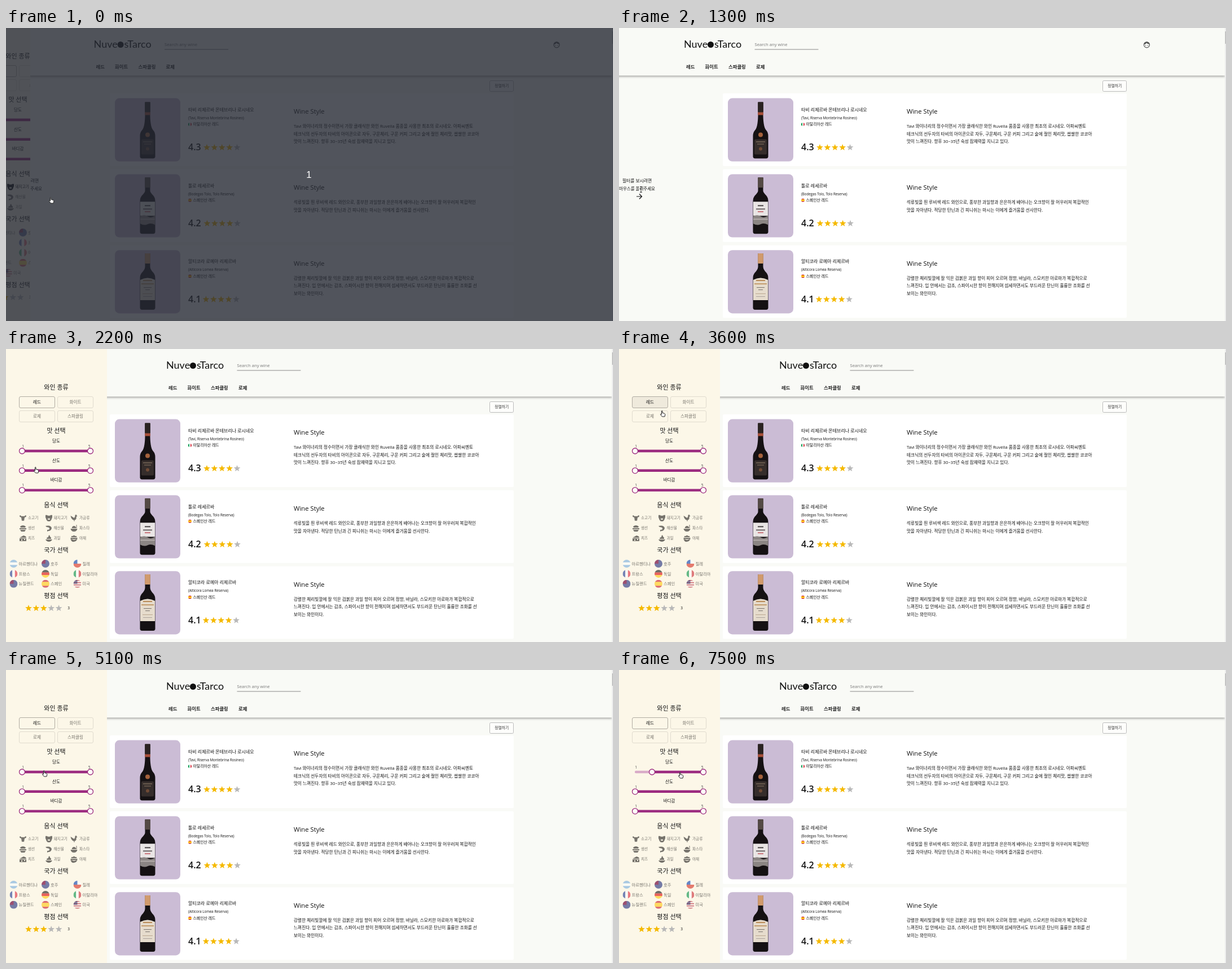
An HTML page with a canvas that plays this animation: 1076 by 520 pixels, repeating every 8 s.

```html
<!DOCTYPE html>
<html lang="ko">
<meta charset="utf-8">
<style>
html, body { margin: 0; width: 100%; height: 100%; overflow: hidden; background: #f9faf6 }
canvas { display: block }
</style>
<canvas id="stage" width="1076" height="520"></canvas>
<script>
const g = document.getElementById('stage').getContext('2d');
const FONT = '"Open Sans", "Noto Sans CJK KR", "Noto Sans CJK", sans-serif';
const PURPLE = '#9b2a7f', GOLD = '#f5b900', PAGE = '#f9faf6';

const wines = [
  { title: '타비 리제르바 몬테브리나 로시네오', sub: '(Tavi, Riserva Montebrina Rosineo)',
    origin: '이탈리아산 레드', flag: 5, rate: '4.3', starX: 356, cap: '#2a2321', shoulder: 54,
    text: ['Tavi 와이너리의 정수이면서 가장 클래식한 와인 Ruvella 품종을 사용한 최초의 로시네오. 아파씨멘토',
      '테크닉의 선두자의 타비의 아이콘으로 자두, 구운체리, 구운 커피 그리고 술에 절인 체리맛, 쌉쌀한 코코아',
      '맛이 느껴진다. 향후 30~35년 숙성 잠재력을 지니고 있다.'] },
  { title: '톨로 레세르바', sub: '(Bodegas Tolo, Tolo Reserva)',
    origin: '스페인산 레드', flag: 7, rate: '4.2', starX: 356.5, cap: '#544a45', shoulder: 36,
    text: ['석류빛을 띈 루비색 레드 와인으로, 풍부한 과일향과 은은하게 배어나는 오크향이 잘 어우러져 복합적인',
      '맛을 자아낸다. 적당한 탄닌과 긴 피니쉬는 마시는 이에게 즐거움을 선사한다.'] },
  { title: '알티코라 로메아 리제르바', sub: '(Alticora Lomea Reserva)',
    origin: '스페인산 레드', flag: 7, rate: '4.1', starX: 354.5, cap: '#d09a6c', shoulder: 38,
    text: ['강렬한 체리빛깔에 잘 익은 검붉은 과일 향이 피어 오르며 정향, 바닐라, 스모키한 아로마가 복합적으로',
      '느껴진다. 입 안에서는 감초, 스파이시한 향이 전해지며 섬세하면서도 부드러운 탄닌이 훌륭한 조화를 선',
      '보이는 와인이다.'] }
];

// name, stripe direction, stripe colours, corner colour
const countries = [
  ['아르헨티나', 'h', ['#74acdf', '#fff', '#74acdf']],
  ['호주', 'h', ['#1d2a7c'], '#b8324c'],
  ['칠레', 'h', ['#fff', '#d52b1e'], '#0039a6'],
  ['프랑스', 'v', ['#1f3a93', '#fff', '#e0283c']],
  ['독일', 'h', ['#111', '#d00', '#fc0']],
  ['이탈리아', 'v', ['#009246', '#fff', '#ce2b37']],
  ['뉴질랜드', 'h', ['#1d2a7c'], '#b8324c'],
  ['스페인', 'h', ['#c60b1e', '#ffc400', '#ffc400', '#c60b1e']],
  ['미국', 'h', ['#b22234', '#fff', '#b22234', '#fff', '#b22234', '#fff', '#b22234'], '#3c3b6e']
];

const foods = [
  ['소고기', 'M-6-4Q-4-5-3-3H3Q4-5 6-4Q6-1 3-1L2 5H-2L-3-1Q-6-1-6-4Z'],
  ['돼지고기', 'M-6-5H-3L-2-4H2L3-5H6V-1L4 4L2 6H-2L-4 4L-6-1ZM-2 1H2V3H-2Z'],
  ['가금류', 'M-6-4L-3-2L0 0Q2-1 2-5L4-6L5-4L6-3L4-2Q5 3 1 4V6H0V4Q-5 3-6-4Z'],
  ['생선', 'M-5-3Q0-7 5-3L4-1H-4ZM-6 0H6V2H-6ZM-5 3H5L3 6H-3Z'],
  ['해산물', 'M-6-4Q4-6 5 0Q4 5-1 5L-3 6V3Q2 3 1 0Q0-2-4-2Z'],
  ['파스타', 'M-6 1H6Q5 6 0 6T-6 1ZM-4 0Q-3-4 0-4T4 0ZM4-6H5V0H4Z'],
  ['치즈', 'M-6-1L1-5Q6-4 6-1ZM-6 0H6V5H-6ZM-3 2V4H-1V2ZM2 1V3H4V1Z'],
  ['과일', 'M-6 2H6Q4 6 0 6T-6 2ZM-4 1Q-4-2-1-2Q-1-5 1-6Q2-2 4-1V1Z'],
  ['야채', 'M-6-1H6Q6 5 0 6T-6-1ZM-5-2Q-5-5-2-4Q0-7 2-4Q5-5 5-2ZM-4 1V2H-2V1ZM-1 1V3H1V1ZM2 1V2H4V1Z']
];

// time, left, top
const pointer = [
  [0, 76, 300], [100, 78, 301], [200, 78, 301], [900, 46, 282], [1000, 46, 282], [1100, 37, 281],
  [1900, 37, 281], [2200, 49, 209], [2400, 49, 210], [2500, 49, 210], [3200, 76, 93], [3500, 76, 93],
  [3600, 73, 109], [4300, 81, 186], [4400, 81, 186], [4500, 80, 186], [4600, 80, 186], [4700, 65, 180],
  [4800, 65, 180], [5100, 64, 178], [6300, 64, 178], [6500, 98, 180], [7100, 98, 180], [7500, 105, 181],
  [8000, 105, 181]
];

const HAND = new Path2D('M2.5 1Q3.3 0 4 1V4.4L7.8 5.4Q9 6 8.7 8L8 11H3.5L.6 7.6Q0 6 1.4 6.4L2.5 7.2Z');
const ARROW = new Path2D('M0 0V9.5L2.2 7.5L3.8 11L5.2 10.3L3.7 7H6.6Z');

function rect(x, y, w, h, color, r = 0, line) {
  g.beginPath();
  g.roundRect(x, y, w, h, r);
  if (color) { g.fillStyle = color; g.fill(); }
  if (line) { g.strokeStyle = line; g.lineWidth = 1; g.stroke(); }
}

function dot(x, y, r, fill, line, width = 1) {
  g.beginPath();
  g.arc(x, y, r, 0, 7);
  if (fill) { g.fillStyle = fill; g.fill(); }
  if (line) { g.strokeStyle = line; g.lineWidth = width; g.stroke(); }
}

// y is the middle of the capitals
function text(s, x, y, size, color = '#111', align = 'left', weight = 400, font = FONT) {
  g.font = `${weight} ${size}px ${font}`;
  g.fillStyle = color;
  g.textAlign = align;
  g.fillText(s, x, y + size * .36);
}

function stars(x, y, gold) {
  for (let i = 0; i < 5; i++) {
    g.beginPath();
    for (let k = 0; k < 10; k++) {
      const r = k % 2 ? 2.6 : 6.2, a = k * Math.PI / 5;
      g.lineTo(x + i * 13.4 + r * Math.sin(a), y + .6 - r * Math.cos(a));
    }
    g.fillStyle = i < gold ? GOLD : '#b8b8b8';
    g.fill();
  }
}

function flag([, dir, colors, corner], x, y, r) {
  g.save();
  g.beginPath();
  g.arc(x, y, r, 0, 7);
  g.clip();
  const s = 2 * r / colors.length;
  colors.forEach((c, i) => dir == 'h' ? rect(x - r, y - r + i * s, 2 * r, s, c)
                                      : rect(x - r + i * s, y - r, s, 2 * r, c));
  if (corner) rect(x - r, y - r, r, r, corner);
  g.restore();
}

function bottle(i, y, { cap, shoulder: s }) {
  g.save();
  g.translate(251, y);
  g.fillStyle = '#151113';
  g.fill(new Path2D(`M-4.5 0H4.5V24Q5 ${s - 9} 10 ${s - 4}Q13.5 ${s} 13.5 ${s + 6}V97Q13 100 10 100
    H-10Q-13 100-13.5 97V${s + 6}Q-13.5 ${s}-10 ${s - 4}Q-5 ${s - 9}-4.5 24Z`));
  rect(-4.8, 0, 9.6, 18, cap, 1);
  if (i == 0) {
    rect(-4.8, 18, 9.6, 5, '#a8503a');
    dot(0, 58, 4, '#a5623c');
    rect(-11, 66, 22, 27, '#352d2b', 2);
    rect(-8, 70, 16, 1, '#9a8670');
    rect(-6, 74, 12, 1, '#8a7663');
    dot(0, 83, 3, '#6f4a35');
  } else if (i == 1) {
    rect(-13, 43, 26, 25, '#e9e5e4');
    rect(-5, 49, 10, 2, '#4b4748');
    rect(-8, 55, 16, 2, '#6d6667');
    rect(-5, 60, 10, 1.5, '#c0515a');
    g.fillStyle = '#8b8583';
    g.fill(new Path2D('M-13 69Q-6 65 0 69T13 68V84Q6 80 0 83T-13 82Z'));
    rect(-13, 73, 26, 2, '#b4adab');
  } else {
    g.fillStyle = '#e6dccd';
    g.fill(new Path2D('M-13 47Q0 40 13 47V83H-13Z'));
    rect(-8, 47, 16, 2, '#b98a55');
    rect(-11, 53, 22, 2, '#c39b6c');
    rect(-7, 60, 14, 1, '#77706a');
    rect(-4, 64, 8, 1, '#77706a');
    rect(-9, 71, 18, 1, '#b9a58d');
    rect(-8, 76, 16, 1, '#a9a09a');
  }
  g.restore();
}

function card(wine, i) {
  g.save();
  g.translate(0, i * 134.8);
  rect(184, 116, 716, 129, '#fff', 2);
  rect(193, 124.6, 116, 112.2, '#cbbcd5', 8);
  bottle(i, i ? 130.5 : 131.5, wine);
  text(wine.title, 323, 145, 8);
  text(wine.sub, 323, 159.5, 6.2);
  flag(countries[wine.flag], 326, 171, 3);
  text(wine.origin, 331.5, 171, 6.9);
  text(wine.rate, 323, 211.5, 16, '#111', 'left', 600);
  stars(wine.starX, 211.5, 4);
  text('Wine Style', 510, 148, 11.3, '#111', 'left', 500);
  wine.text.forEach((s, k) => text(s, 510, 174.5 + k * 13.5, 7.7));
  g.restore();
}

function header(shift) {
  g.save();
  g.shadowColor = 'rgba(0,0,0,.4)';
  g.shadowBlur = 4;
  g.shadowOffsetY = 1.5;
  rect(-10, -10, 1084, 94.5, PAGE);
  g.restore();
  g.save();
  g.translate(shift, 0);
  text('Nuve', 115, 28.5, 18, '#111', 'left', 400, 'Lato, sans-serif');
  dot(162.5, 29.5, 5.5, '#111');
  text('sTarco', 169, 28.5, 18, '#111', 'left', 400, 'Lato, sans-serif');
  text('Search any wine', 240.5, 29.5, 7.7, '#777');
  rect(240.5, 37.5, 113, 1, '#8a8a8a');
  [['레드', 119], ['화이트', 152.5], ['스파클링', 194], ['로제', 243]]
    .forEach(([s, x]) => text(s, x, 68.5, 8.4, '#222', 'left', 700));
  dot(935.5, 29.8, 5, null, '#555', 1.2);
  g.fillStyle = '#555';
  g.fill(new Path2D('M930.5 29Q934 29 935 26.5Q937 29 940.5 28.5Q939 24.5 935.5 24.5Q931 25 930.5 29Z'));
  dot(933.6, 31, .7, '#555');
  dot(937.4, 31, .7, '#555');
  g.restore();
}

function page(t, shift) {
  rect(0, 0, 1076, 520, PAGE);
  wines.forEach(card);
  rect(857.5, 93.5, 42, 19, '#fdfdfb', 2, '#bbb');
  text('정렬하기', 878.7, 103, 6.8, '#333', 'center');
  text('필터를 보시려면', 32, 271.5, 7.8, '#111', 'center');
  text('마우스를 올려주세요', 32, 285.5, 7.5, '#111', 'center');
  g.strokeStyle = '#111';
  g.lineWidth = 1.2;
  const ax = t < 1300 ? 37 : 36;
  g.stroke(new Path2D(`M${ax - 5} 299H${ax + 4}M${ax} 294.5L${ax + 4.5} 299L${ax} 303.5`));
  header(shift);
  rect(1074, 0, 2, 520, '#ececec');
  rect(1074.5, 6, 1.5, 22, '#b9b9b9');
}

function slider(label, y, from) {
  text(label, 89, y - 18, 7.5, '#111', 'center');
  text('1', 30, y - 8.5, 6.5, '#444', 'center');
  text('5', 147.5, y - 8.5, 6.5, '#444', 'center');
  rect(28, y - 2.2, 122, 4.4, '#d9abc8', 2);
  rect(from, y - 2.2, 150 - from, 4.4, PURPLE, 2);
  for (const x of [from, 149.5]) dot(x, y, 5, '#fffdf8', PURPLE, 1.3);
}

function drawer(t, w) {
  const narrow = w < 100, title = (s, y) => text(s, 89, y, 11, '#111', 'center', 500);
  g.save();
  g.beginPath();
  g.rect(0, 0, w, 520);
  g.clip();
  rect(0, 0, w, 520, '#fcf7e8');
  g.translate(w / 2 - 89.5, narrow ? -18 : 0);

  title('와인 종류', 68.5);
  ['레드', '화이트', '로제', '스파클링'].forEach((s, i) => {
    const x = 23.5 + i % 2 * 68, y = 84.5 + (i >> 1) * 25;
    const hover = !i && t >= 2900 && t < 3700;
    rect(x, y, 63, 20, hover ? '#efeadc' : null, 2.5, i ? '#e0dbce' : '#b0aca2');
    text(s, x + 31.5, y + 10, 7.6, i ? '#77746c' : '#111', 'center');
  });

  title('맛 선택', 145);
  slider('당도', 181, t < 5900 ? 28.5 : 58.5);
  slider('산도', 215.8, 28.5);
  slider('바디감', 250.6, 28.5);

  title('음식 선택', 277);
  foods.forEach(([s, d], i) => {
    const c = i % 3, y = 299.7 + (i / 3 | 0) * 18.2;
    const color = narrow && i == 1 ? '#111' : '#76736c';
    g.save();
    g.translate([30, 76, 120.5][c], y);
    g.fillStyle = color;
    g.fill(new Path2D(d), 'evenodd');
    g.restore();
    text(s, [39, 84.5, 130][c], y, 6.6, color);
  });

  title('국가 선택', 357.5);
  const cols = narrow ? 2 : 3;
  countries.forEach((c, i) => {
    const x = !narrow ? 13.5 + i % 3 * 56.5 : i == 8 ? 72 : 42 + i % 2 * 56;
    const y = 381 + (i / cols | 0) * 17.9;
    g.globalAlpha = .6;
    flag(c, x, y, 7);
    g.globalAlpha = 1;
    text(c[0], x + 9, y, 7.3, '#76736c');
  });

  if (narrow) g.translate(0, 36);
  title('평점 선택', 438.5);
  stars(40, 459.5, 3);
  text('3', 111, 460, 6.5, '#111', 'center');
  g.restore();
}

function cursor(t) {
  const i = Math.max(1, pointer.findIndex(k => k[0] >= t));
  const [t0, x0, y0] = pointer[i - 1], [t1, x1, y1] = pointer[i];
  const p = (t - t0) / (t1 - t0);
  g.save();
  g.translate(x0 + (x1 - x0) * p, y0 + (y1 - y0) * p);
  g.lineJoin = 'round';
  if (t < 100 || t >= 1600) {
    g.lineWidth = 1;
    g.strokeStyle = '#222';
    g.fillStyle = '#fff';
    g.fill(HAND);
    g.stroke(HAND);
  } else if (t < 900) {
    g.lineWidth = 1.2;
    g.strokeStyle = '#fff';
    g.fillStyle = '#111';
    g.stroke(ARROW);
    g.fill(ARROW);
  } else {
    g.lineWidth = 1;
    g.strokeStyle = '#333';
    g.stroke(new Path2D('M0 .5H4M2 .5V10.5M0 10.5H4'));
  }
  g.restore();
}

function drawerWidth(t) {
  if (t < 100) return 43;
  if (t < 300) return 1;
  if (t < 1600) return 0;
  return t < 1700 ? 110 : 179;
}

function draw(now) {
  const t = Math.floor(now % 8000 / 100) * 100, w = drawerWidth(t);
  page(t, w * .944);
  if (w > 1) drawer(t, w);
  if (t < 100) {
    rect(0, 0, 1076, 520, 'rgba(38,42,52,.8)');
    text('1', 537, 260, 17, '#fff', 'center', 400, '"Liberation Sans", sans-serif');
  }
  cursor(t);
  requestAnimationFrame(draw);
}
requestAnimationFrame(draw);
</script>
</html>
```
